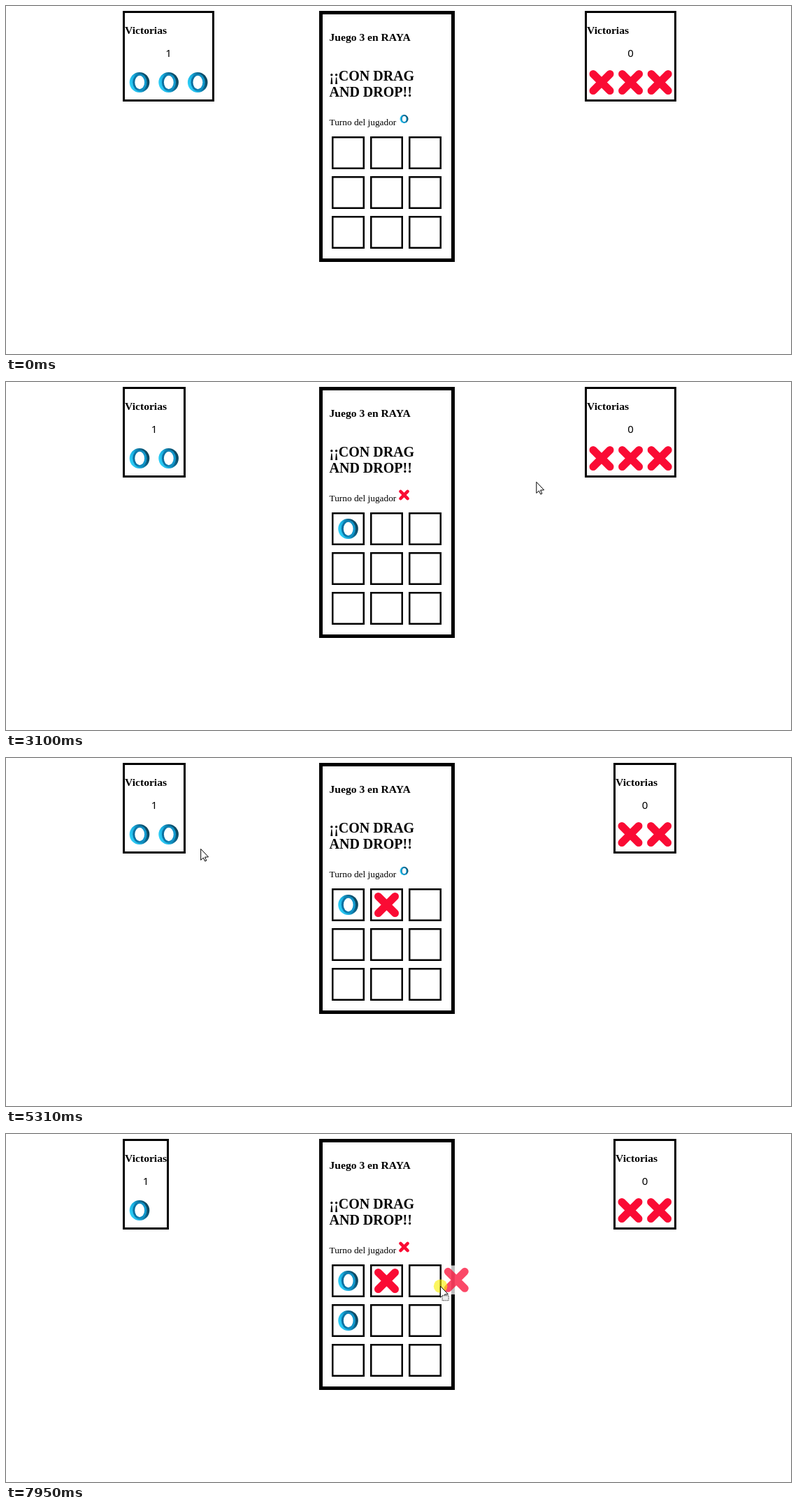
Animation, 1123 px wide and 499 px high, one loop 8000 ms. Source, as an HTML page with a canvas:

```html
<!DOCTYPE html>
<html lang="es">
<head>
<meta charset="utf-8">
<title>3 en raya</title>
<style>
html, body { margin: 0; width: 100%; height: 100%; overflow: hidden; background: #fff; }
canvas { display: block; }
</style>
</head>
<body>
<canvas id="stage" width="1123" height="499"></canvas>
<script>
const ctx = document.getElementById('stage').getContext('2d');
const LOOP = 8000, LAG = 60;
const SERIF = '"Liberation Serif", serif';
const GRID = { x: 466, y: 187, stepX: 55, stepY: 57, size: 47 };
const SLOT = 41.6, PIECE_Y = 109.5;

const ENTRY = { x: 988, y: 457 };
// Each move heads for (x, y); one that carries a piece drops it when the next begins.
const MOVES = [
  { start: 810, time: 520, x: 3, y: 75 },
  { start: 1330, time: 300, x: 238, y: 109 },
  { start: 1940, time: 957, x: 506, y: 214, piece: drawO, home: 232.5 },
  { start: 2750, time: 800, x: 878, y: 112 },
  { start: 3630, time: 260, x: 862, y: 107 },
  { start: 3892, time: 1111, x: 546, y: 207, piece: drawX, home: 851 },
  { start: 4910, time: 330, x: 310, y: 150 },
  { start: 5240, time: 300, x: 235, y: 103 },
  { start: 5678, time: 700, x: 485, y: 272, piece: drawO, home: 232.5 },
  { start: 6300, time: 640, x: 835, y: 117 },
  { start: 6940, time: 350, x: 890, y: 116 },
  { start: 7440, time: 854, x: 570, y: 221, piece: drawX, home: 893, bend: 4 }
];
MOVES.forEach((move, i) => { move.end = i + 1 < MOVES.length ? MOVES[i + 1].start : LOOP; });

const easeOut = (u, power = 2) => 1 - (1 - u) ** power;

function pointerAt(t) {
  let { x, y } = ENTRY;
  for (const move of MOVES) {
    if (t < move.start) break;
    const u = Math.min(1, (Math.min(t, move.end) - move.start) / move.time);
    x += (move.x - x) * easeOut(u);
    y += (move.y - y) * easeOut(u, move.bend);
  }
  return { x, y };
}

function cellAt(x, y) {
  return { col: Math.floor((x - GRID.x) / GRID.stepX), row: Math.floor((y - GRID.y) / GRID.stepY) };
}

function overCell(x, y) {
  const { col, row } = cellAt(x, y);
  const inGrid = Math.min(col, row) >= 0 && Math.max(col, row) < 3;
  return inGrid && x - GRID.x - col * GRID.stepX <= GRID.size
    && y - GRID.y - row * GRID.stepY <= GRID.size;
}

function frame(x, y, w, h, line) {
  ctx.strokeStyle = '#000';
  ctx.lineWidth = line;
  ctx.strokeRect(x + line / 2, y + line / 2, w - line, h - line);
}

function label(text, x, y, font, align = 'left') {
  ctx.font = font;
  ctx.textAlign = align;
  ctx.fillStyle = '#000';
  ctx.fillText(text, x, y);
}

function at(x, y, draw, scale = 1) {
  ctx.save();
  ctx.translate(x, y);
  ctx.scale(scale, scale);
  draw();
  ctx.restore();
}

function ellipse(x, y, rx, ry, fill) {
  ctx.beginPath();
  ctx.ellipse(x, y, rx, ry, 0, 0, Math.PI * 2);
  ctx.fillStyle = fill;
  ctx.fill();
}

function shade(x, y, ...colors) {
  const gradient = ctx.createLinearGradient(-x, y, x, -y);
  colors.forEach((color, i) => gradient.addColorStop(i / (colors.length - 1), color));
  return gradient;
}

function drawO() {
  ellipse(0, 0, 14.3, 14.6, shade(13, 5, '#2fd0f8', '#18aee0', '#0b6a94', '#0d4257'));
  ellipse(0.4, 0, 10, 12.2, shade(9, 0, '#0a6c9c', '#129bd0'));
  ellipse(0.2, 0, 6.9, 9.7, '#fff');
}

function drawX() {
  ctx.strokeStyle = '#fa0b34';
  ctx.lineWidth = 11;
  ctx.lineCap = 'round';
  ctx.beginPath();
  for (const side of [-1, 1]) {
    ctx.moveTo(-12 * side, -12);
    ctx.lineTo(12 * side, 12);
  }
  ctx.stroke();
}

const panelWidth = count => Math.round(Math.max(66, 6.5 + SLOT * count));

function panel(x, wins, count, piece) {
  const width = panelWidth(count);
  frame(x, 7, width, 130, 3);
  label('Victorias', x + 3, 40, 'bold 15.6px ' + SERIF);
  label(wins, x + width / 2, 73, '15px "Noto Sans", sans-serif', 'center');
  for (let i = 0; i < count; i++) at(x + 24 + i * SLOT, PIECE_Y, piece);
}

function board(turn) {
  frame(448, 7, 194, 360, 5);
  label('Juego 3 en RAYA', 462.5, 50, 'bold 15.6px ' + SERIF);
  label('¡¡CON DRAG', 462.5, 107, 'bold 20px ' + SERIF);
  label('AND DROP!!', 462.5, 130, 'bold 20px ' + SERIF);
  label('Turno del jugador', 462.5, 171, '13.33px ' + SERIF);
  at(569.5, 162, turn, 0.42);
  for (let i = 0; i < 9; i++) {
    const x = GRID.x + (i % 3) * GRID.stepX, y = GRID.y + Math.floor(i / 3) * GRID.stepY;
    frame(x, y, GRID.size, GRID.size, 2.5);
  }
}

function arrow() {
  const outline = new Path2D('M0 0V16L3.6 12.7L6 17.6L8.1 16.7L5.8 11.8L10.8 11.5Z');
  ctx.fillStyle = '#fff';
  ctx.fill(outline);
  ctx.strokeStyle = '#000';
  ctx.lineWidth = 1;
  ctx.stroke(outline);
}

function dropArrow() {
  arrow();
  ctx.fillStyle = '#eee';
  ctx.fillRect(2, 13, 10, 8);
  ctx.setLineDash([1.5, 1]);
  ctx.strokeStyle = '#333';
  ctx.strokeRect(2.5, 13.5, 9, 7);
  ctx.setLineDash([]);
}

function forbidden() {
  ctx.strokeStyle = '#222';
  ctx.lineWidth = 1.7;
  ctx.beginPath();
  ctx.arc(0, 0, 6.8, 0, Math.PI * 2);
  ctx.moveTo(-4.8, -4.8);
  ctx.lineTo(4.8, 4.8);
  ctx.stroke();
}

// The dragged picture trails a little behind the pointer.
function ghost(move, t) {
  const grab = pointerAt(move.start);
  const { x, y } = pointerAt(Math.max(move.start, t - LAG));
  ctx.globalAlpha = 0.75;
  at(x + move.home - grab.x, y + PIECE_Y - grab.y, () => {
    ctx.fillStyle = '#fff';
    ctx.fillRect(-SLOT / 2, -SLOT / 2, SLOT, SLOT);
    move.piece();
  });
  ctx.globalAlpha = 1;
}

function render(t) {
  ctx.fillStyle = '#fff';
  ctx.fillRect(0, 0, 1123, 499);

  const placed = MOVES.filter(move => move.piece && t >= move.end);
  const left = piece => 3 - placed.filter(move => move.piece === piece).length;

  panel(167, '1', left(drawO), drawO);
  panel(958 - panelWidth(left(drawX)) + 1, '0', left(drawX), drawX);
  board(placed.length % 2 ? drawX : drawO);
  for (const move of placed) {
    const { col, row } = cellAt(move.x, move.y);
    at(GRID.x + col * GRID.stepX + 23.5, GRID.y + row * GRID.stepY + 23.5, move.piece);
  }

  if (t < MOVES[0].start) return;
  const { x, y } = pointerAt(t);
  const current = MOVES.find(move => t >= move.start && t < move.end);
  if (!current.piece) return at(x, y, arrow);

  ghost(current, t);
  ellipse(x, y, 9.8, 9.8, 'rgba(250,240,0,0.62)');
  at(x, y, overCell(x, y) ? dropArrow : forbidden);
}

const begin = performance.now();
function tick() {
  render((performance.now() - begin) % LOOP);
  requestAnimationFrame(tick);
}
tick();
</script>
</body>
</html>
```
